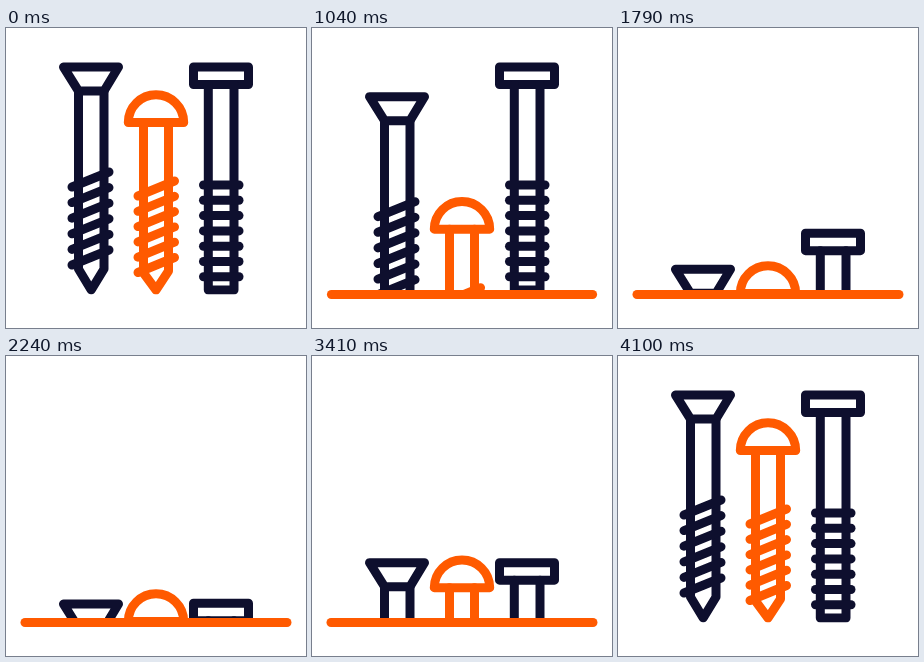
Recreate the animation shown at these times as an HTML page with a canvas. Size 300 px wide and 300 px high, loop 4160 ms.

```html
<!DOCTYPE html>
<html lang="en">
<head>
<meta charset="utf-8">
<title>Screws</title>
<style>
  html, body { margin: 0; width: 100%; height: 100%; overflow: hidden; background: #fff; }
  canvas { display: block; width: 100vw; height: 100vh; }
</style>
</head>
<body>
<canvas id="stage"></canvas>
<script>
const SIZE = 300, LOOP = 4160;
const NAVY = '#0e0f2e', ORANGE = '#ff5a00';
const WEIGHT = 9, GROUND = 266.5, HALF = 131;
const SINK = 1200, GROW = 754;
const IN_START = 525, STAGGER = 300, OUT_END = 4085, TURN = 2600;

const canvas = document.getElementById('stage');
const ctx = canvas.getContext('2d');

function fit() {
  canvas.width = Math.round(innerWidth * devicePixelRatio);
  canvas.height = Math.round(innerHeight * devicePixelRatio);
}
addEventListener('resize', fit);
fit();

const clamp = v => Math.min(1, Math.max(0, v));

// Cubic bezier easing (x1, 0, x2, 1), solved by bisection.
function ease(x, x1 = 0.3, x2 = 0.33) {
  if (x <= 0 || x >= 1) return clamp(x);
  let lo = 0, hi = 1, s = 0.5;
  for (let i = 0; i < 30; i++) {
    s = (lo + hi) / 2;
    const r = 1 - s;
    if (3 * r * r * s * x1 + 3 * r * s * s * x2 + s * s * s < x) lo = s;
    else hi = s;
  }
  return s * s * (3 - 2 * s);
}

const easeOut = x => 1 - Math.pow(1 - x, 5);

// Runs forward from its start, then backward to the common end.
function phase(t, start, length) {
  return clamp((t < TURN ? t - start : OUT_END - t) / length);
}

function path(points, closed) {
  ctx.beginPath();
  points.forEach(([x, y]) => ctx.lineTo(x, y));
  if (closed) ctx.closePath();
  ctx.stroke();
}

function threads(count, x1, y1, x2, y2, gap) {
  for (let i = 0; i < count; i++) path([[x1, y1 + i * gap], [x2, y2 + i * gap]]);
}

function flatScrew() {
  path([[57.5, 39], [112.5, 39], [98, 63], [72.5, 63]], true);
  path([[72.5, 63], [72.5, 241], [85.2, 262], [98, 241], [98, 63]]);
  threads(6, 66, 159, 103, 144, 15.6);
}

function domeScrew() {
  ctx.beginPath();
  ctx.arc(150, 94.5, 27.7, Math.PI, 0);
  ctx.closePath();
  ctx.stroke();
  path([[137.5, 94.5], [137.5, 245], [150, 262], [162.5, 243], [162.5, 94.5]]);
  threads(6, 132, 168, 168.5, 153, 15.3);
}

function bolt() {
  path([[187.5, 39], [242.5, 39], [242.5, 56.5], [187.5, 56.5]], true);
  path([[202.3, 56.5], [202.3, 262], [228, 262], [228, 56.5]]);
  threads(7, 197.5, 157, 233, 157, 15.3);
}

const parts = [
  { draw: flatScrew, color: NAVY, drop: 209, order: 1 },
  { draw: domeScrew, color: ORANGE, drop: 171, order: 0 },
  { draw: bolt, color: NAVY, drop: 209, order: 2 }
];

function render(t) {
  ctx.setTransform(canvas.width / SIZE, 0, 0, canvas.height / SIZE, 0, 0);
  ctx.fillStyle = '#fff';
  ctx.fillRect(0, 0, SIZE, SIZE);
  ctx.lineWidth = WEIGHT;
  ctx.lineCap = ctx.lineJoin = 'round';

  ctx.save();
  ctx.beginPath();
  ctx.rect(0, 0, SIZE, GROUND);
  ctx.clip();
  for (const { draw, color, drop, order } of parts) {
    const p = phase(t, IN_START + order * STAGGER, SINK);
    ctx.save();
    ctx.translate(0, drop * ease(p));
    ctx.strokeStyle = color;
    draw();
    ctx.restore();
  }
  ctx.restore();

  const half = HALF * easeOut(phase(t, IN_START, GROW));
  if (half > 0) {
    ctx.strokeStyle = ORANGE;
    path([[150 - half, GROUND], [150 + half, GROUND]]);
  }
}

const began = performance.now();
function tick() {
  render((performance.now() - began) % LOOP);
  requestAnimationFrame(tick);
}
tick();
</script>
</body>
</html>
```
